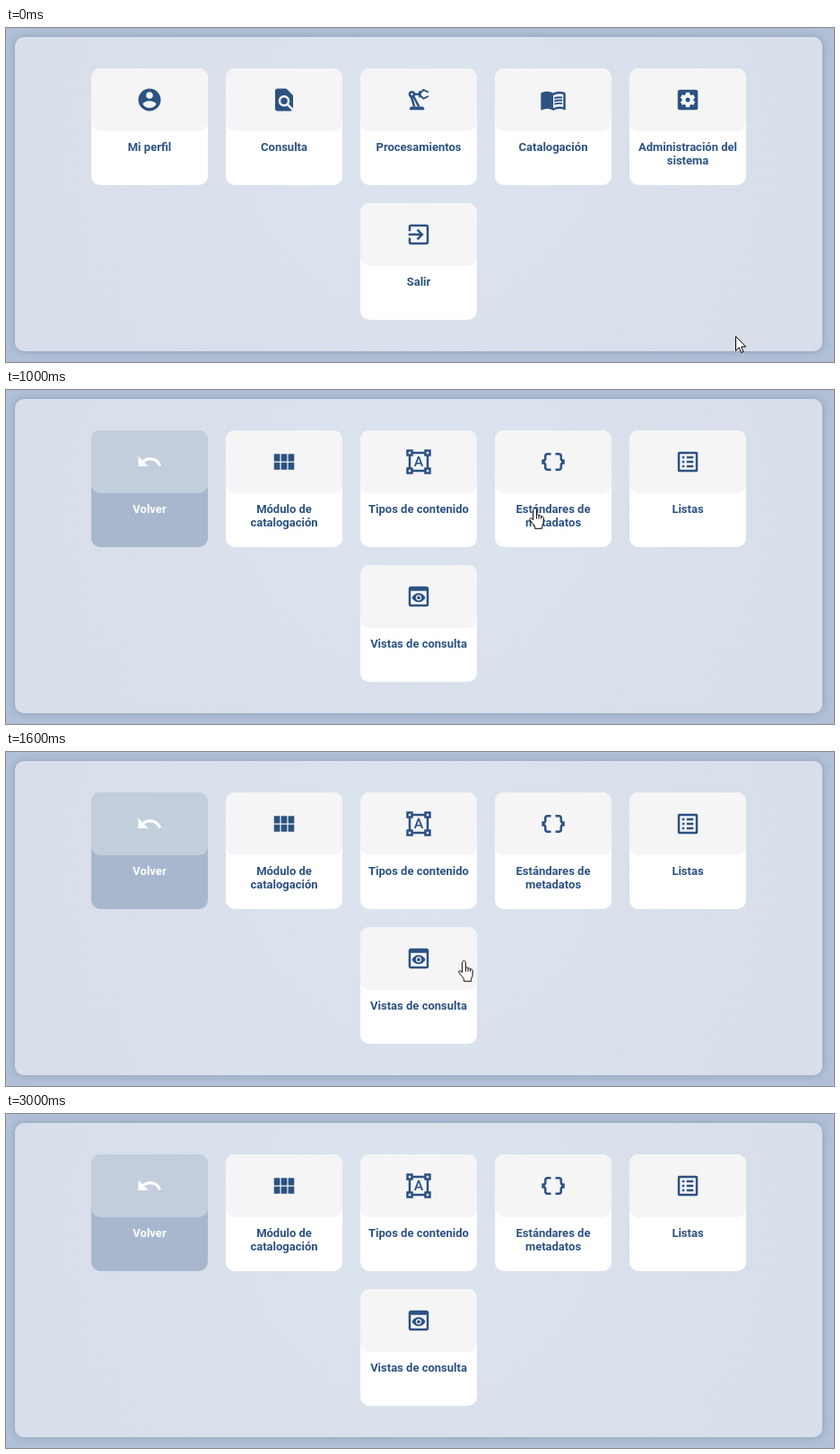
An HTML page for the animation above (3800 ms loop, 923 by 372 pixels).

```html
<!DOCTYPE html>
<html lang="es">
<head>
<meta charset="utf-8">
<title>Menú</title>
<style>
html, body { margin: 0; width: 100%; height: 100%; overflow: hidden; }
body { position: relative; background: #b0c0d6; font: bold 13px/15px Roboto, sans-serif; color: #2c5282; }
.panel {
  position: absolute; left: 10px; top: 10px; width: 900px; height: 350px; border-radius: 10px;
  background: radial-gradient(ellipse 420px 400px at 50% 35%, #dbe4ef, #d8deea);
  box-shadow: 0 0 8px rgba(60, 80, 120, .3);
}
.page { position: absolute; inset: 0; animation: 3800ms step-end infinite; }
#main { animation-name: showMain; }
#catalog { animation-name: showCatalog; }
.card {
  position: absolute; width: 130px; height: 130px; border-radius: 10px;
  background: #fff; text-align: center; white-space: nowrap;
}
.top {
  height: 70px; margin-bottom: 10px; border-radius: 10px; background: #f5f5f5;
  display: flex; align-items: center; justify-content: center;
}
.card svg { width: 30px; height: 30px; fill: currentColor; fill-rule: evenodd; }
.card .line { fill: none; stroke: currentColor; }
.card .cut { fill: #f5f5f5; stroke: #f5f5f5; }
.back { background: #a8b7ce; color: #fff; }
.back .top { background: #c2cedb; }
.open, .meta, .views { animation: 3800ms ease infinite; }
.open { animation-name: growOpen; }
.meta { animation-name: growMeta; }
.views { animation-name: growViews; }
#cursor { position: absolute; left: 0; top: 0; animation: travel 3800ms linear infinite; }
#cursor svg {
  position: absolute; left: 0; top: 0; overflow: visible; fill: #fff; stroke: #000;
  stroke-linejoin: round; animation: 3800ms step-end infinite;
}
#arrow { animation-name: showArrow !important; }
#hand { animation-name: showHand !important; }

@keyframes showMain { 0% { opacity: 1 } 26.31%, 100% { opacity: 0 } }
@keyframes showCatalog { 0% { opacity: 0 } 26.31%, 100% { opacity: 1 } }
@keyframes growOpen { 0%, 8.42% { transform: none } 13.68%, 100% { transform: scale(1.1) } }
@keyframes growMeta {
  0%, 26.31% { transform: scale(1) }
  31.57%, 35% { transform: scale(1.1) }
  40.26%, 100% { transform: scale(1) }
}
@keyframes growViews {
  0%, 41.97% { transform: scale(1) }
  47.24%, 72.76% { transform: scale(1.1) }
  78.03%, 100% { transform: scale(1) }
}
@keyframes travel {
  0% { transform: translate(813px, 343px) }
  1.58% { transform: translate(813px, 343px); animation-timing-function: ease }
  13.68% { transform: translate(589px, 131px) }
  31.7% { transform: translate(589px, 131px); animation-timing-function: ease-in }
  35% { transform: translate(582px, 182px) }
  36.84% { transform: translate(570px, 209px) }
  40.26% { transform: translate(531px, 227px) }
  42.1% { transform: translate(510px, 232px); animation-timing-function: ease-out }
  48.42% { transform: translate(442px, 255px) }
  66.84% { transform: translate(442px, 255px); animation-timing-function: ease-in-out }
  78.94%, 100% { transform: translate(333px, 374px) }
}
@keyframes showArrow {
  0% { opacity: 1 } 8.42% { opacity: 0 }
  35% { opacity: 1 } 41.97% { opacity: 0 }
  72.76% { opacity: 1 } 78.9%, 100% { opacity: 0 }
}
@keyframes showHand {
  0% { opacity: 0 } 8.42% { opacity: 1 }
  35% { opacity: 0 } 41.97% { opacity: 1 }
  72.76%, 100% { opacity: 0 }
}
</style>
</head>
<body>
<div class="panel"></div>
<div class="page" id="main"></div>
<div class="page" id="catalog"></div>
<div id="cursor">
  <svg id="arrow" width="13" height="20"><path d="M.5.5v16l3.7-3.6 2.4 5.6 2.4-1-2.4-5.5h5.1z"/></svg>
  <svg id="hand" width="17" height="24"><g transform="translate(-6)">
    <path d="M6.5.7c1.2 0 1.9.8 1.9 2V8c.5-.5 2.3-.5 2.6.9.8-.6 2.3-.3 2.6 1 .9-.4 2.6 0 2.6 1.7V16c0 2.5-1.7 3.6-1.7 5.5V23.3H6.6v-1.8C6.6 20 3.6 17.3 1 13.7c-.9-1.6 1-2.8 2.3-1.5l1.3 1.5V2.7c0-1.2.8-2 1.9-2z"/>
    <path d="M8.4 8v4.6M11 9v3.6M13.6 10v2.6" fill="none"/>
  </g></svg>
</div>
<script>
const path = (d, attrs = '') => `<path d="${d}" ${attrs}/>`;
const line = (d, width, attrs = '') => path(d, `class="line" stroke-width="${width}" ${attrs}`);

const icons = {
  profile: path('M12 2a10 10 0 1 0 0 20a10 10 0 1 0 0-20zm0 3a3 3 0 1 1 0 6a3 3 0 1 1 0-6zm0 14.2c-2.5 0-4.71-1.28-6-3.22.03-1.99 4-3.08 6-3.08s5.97 1.09 6 3.08c-1.29 1.94-3.5 3.22-6 3.22z'),
  search: path('M20 19.59V8l-6-6H6c-1.1 0-2 .9-2 2v16c0 1.1.9 2 2 2h12c.45 0 .85-.15 1.19-.4l-4.43-4.43A5 5 0 1 1 16.17 15.75zM9 13a3 3 0 1 0 6 0a3 3 0 1 0-6 0z'),
  robot: line('M20.25 5l-4.05-1.9-3 3.1v1.6l3 3.1L20.25 9', 1.5, 'stroke-linecap="round" stroke-linejoin="round"')
    + line('M13 5v4M8 7h4M6 5a2 2 0 1 0 0 4a2 2 0 1 0 0-4z', 2, 'stroke-linecap="round"')
    + path('M4.48 9.58L7.08 18h2.09L6.71 10h.1l4.3 8h2.27L8.41 8.77z')
    + path('M4 21v-1a2 2 0 0 1 2-2h9a2 2 0 0 1 2 2v1z'),
  book: path('M21 5c-1.11-.35-2.33-.5-3.5-.5-1.95 0-4.05.4-5.5 1.5-1.45-1.1-3.55-1.5-5.5-1.5S2.45 4.9 1 6v14.65c0 .25.25.5.75.45C3.1 20.45 5.05 20 6.5 20c1.95 0 4.05.4 5.5 1.5 1.35-.85 3.8-1.5 5.5-1.5 1.65 0 3.35.3 4.75 1.05.4.1.75-.1.75-.45V6c-.6-.45-1.25-.75-2-1zm0 13.5c-1.1-.35-2.3-.5-3.5-.5-1.7 0-4.15.65-5.5 1.5V8c1.35-.85 3.8-1.5 5.5-1.5 1.2 0 2.4.15 3.5.5z')
    + [10.65, 13.3, 15.97].map(y => line(`M13 ${y}q3-1.35 7-.65`, 1.55)).join(''),
  gear: '<rect x="3" y="3" width="18" height="18" rx="2"/><circle class="cut" cx="12" cy="12" r="4.7"/>'
    + path('M12 5.4v13.2M6.28 8.7l11.44 6.6M6.28 15.3l11.44-6.6', 'class="cut" stroke-width="3.5"')
    + '<circle cx="12" cy="12" r="2"/>',
  exit: path('M10.09 15.59L11.5 17l5-5-5-5-1.41 1.41L12.67 11H3v2h9.67zM19 3H5c-1.11 0-2 .9-2 2v4h2V5h14v14H5v-4H3v4c0 1.1.89 2 2 2h14c1.1 0 2-.9 2-2V5c0-1.1-.9-2-2-2z'),
  undo: path('M12.5 8c-2.65 0-5.05.99-6.9 2.6L2 7v9h9l-3.62-3.62c1.39-1.16 3.16-1.88 5.12-1.88 3.54 0 6.55 2.31 7.6 5.5l2.37-.78C21.08 11.03 17.15 8 12.5 8z'),
  grid: [5, 12.5].map(y => path(`M3 ${y}h5.33v6.5H3zm6.33 0h5.34v6.5H9.33zm6.34 0H21v6.5h-5.33z`)).join(''),
  shapes: path('M23 7V1h-6v2H7V1H1v6h2v10H1v6h6v-2h10v2h6v-6h-2V7zM3 3h2v2H3zm2 18H3v-2h2zm12-2H7v-2H5V7h2V5h10v2h2v10h-2zm4 2h-2v-2h2zM19 5V3h2v2zm-5.27 9h-3.49l-.73 2H7.89l3.4-9h1.4l3.41 9h-1.63zm-3.04-1.26h2.61L12 8.91z'),
  braces: line('M10 5H7a2 2 0 0 0-2 2v2a2 2 0 0 1-2 2H2M2 13h1a2 2 0 0 1 2 2v2a2 2 0 0 0 2 2h3M14 5h3a2 2 0 0 1 2 2v2a2 2 0 0 0 2 2h1M22 13h-1a2 2 0 0 0-2 2v2a2 2 0 0 1-2 2h-3', 2)
    + path('M2 10h1.5l1.3 2-1.3 2H2zM22 10h-1.5l-1.3 2 1.3 2H22z'),
  list: '<rect class="line" x="4" y="4" width="16" height="16" rx=".4" stroke-width="2"/>'
    + line('M7 8h2m2 0h6M7 12h2m2 0h6M7 16h2m2 0h6', 2),
  preview: path('M19 3H5c-1.11 0-2 .9-2 2v14c0 1.1.89 2 2 2h14c1.1 0 2-.9 2-2V5c0-1.1-.89-2-2-2zm0 16H5V7h14zM12 9c-2.73 0-5.06 1.66-6 4 .94 2.34 3.27 4 6 4s5.06-1.66 6-4c-.94-2.34-3.27-4-6-4z')
    + '<circle class="cut" cx="12" cy="13" r="2.5" stroke="none" stroke-width="0"/><circle cx="12" cy="13" r="1.5"/>'
};

const pages = {
  main: [
    ['Mi perfil', 'profile'], ['Consulta', 'search'], ['Procesamientos', 'robot'],
    ['Catalogación', 'book', 'open'], ['Administración del<br>sistema', 'gear'], ['Salir', 'exit']
  ],
  catalog: [
    ['Volver', 'undo', 'back'], ['Módulo de<br>catalogación', 'grid'], ['Tipos de contenido', 'shapes'],
    ['Estándares de<br>metadatos', 'braces', 'meta'], ['Listas', 'list'], ['Vistas de consulta', 'preview', 'views']
  ]
};

// Five cards in the first row, the sixth centred below.
function card([label, icon, kind = ''], i) {
  const x = i < 5 ? 95 + 150 * i : 395;
  const y = i < 5 ? 45 : 195;
  return `<div class="card ${kind}" style="left:${x}px;top:${y}px">
    <div class="top"><svg viewBox="0 0 24 24">${icons[icon]}</svg></div>${label}</div>`;
}
for (const id in pages) document.getElementById(id).innerHTML = pages[id].map(card).join('');

// Hold each pose for 1/15 s, like a screen recording.
const LOOP = 3800, STEP = 1000 / 15;
const animations = document.getAnimations();
animations.forEach(a => a.pause());
function tick() {
  const time = Math.floor((performance.now() % LOOP + 3.4) / STEP) * STEP % LOOP;
  animations.forEach(a => { a.currentTime = time; });
  requestAnimationFrame(tick);
}
tick();
</script>
</body>
</html>
```
